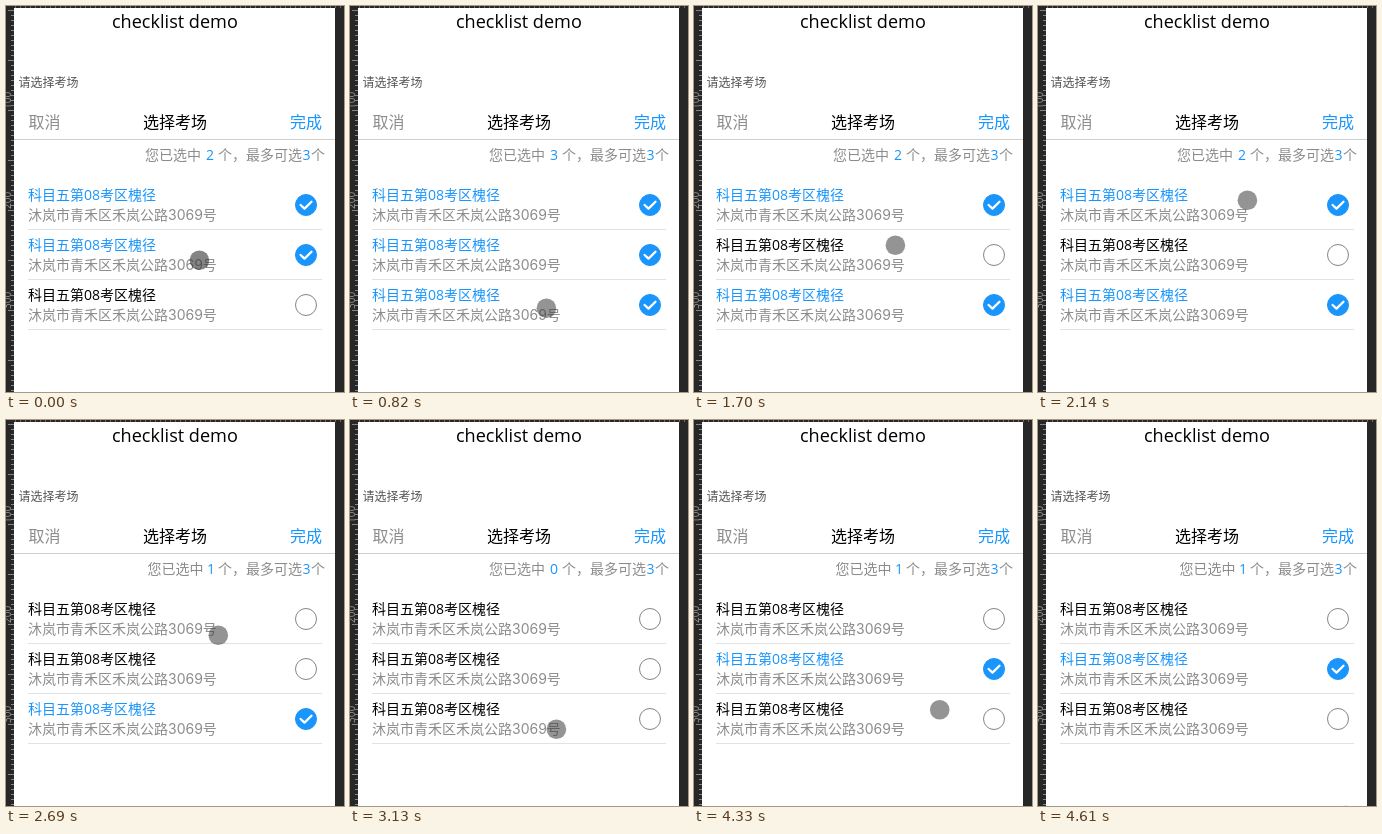
Animation, 338 px wide and 386 px high, one loop 5.04 s. Source, as an HTML page:

```html
<!DOCTYPE html>
<html lang="zh-CN">
<head>
<meta charset="utf-8">
<title>checklist demo</title>
<style>
  html, body { margin: 0; width: 100%; height: 100%; overflow: hidden; background: #272727; }
  svg { display: block; width: 338px; height: 386px; }
  text { font-family: "Open Sans", "Noto Sans CJK SC", "Noto Sans CJK", sans-serif; white-space: pre; }
  .address { font-family: Inter, "Noto Sans CJK SC", "Noto Sans CJK", sans-serif; }
</style>
</head>
<body>
<svg id="stage" viewBox="0 0 338 386"></svg>
<script>
const LOOP = 5040, TICK = 30, ROW = 50;
const BLUE = '#1a95fc', GREY = '#8c8c8c', BLACK = '#000';
const stage = document.getElementById('stage');

function add(tag, attrs, content) {
  const el = document.createElementNS('http://www.w3.org/2000/svg', tag);
  set(el, attrs);
  if (content !== undefined) el.textContent = content;
  return stage.appendChild(el);
}
function set(el, attrs) {
  for (const key in attrs) el.setAttribute(key, attrs[key]);
}
const label = (x, y, size, fill, content) =>
  add('text', { x, y, fill, 'font-size': size }, content);
const rect = (x, y, width, height, fill) =>
  add('rect', { x, y, width, height, fill });

function drawRulers() {
  rect(0, 0, 338, 386, '#272727');
  for (let y = 4; y < 386; y += 5) {
    const length = (y - 4) % 50 ? 3 : 6;
    rect(8 - length, y, length, 1, '#858585');
  }
  for (let x = 9; x < 338; x += 5) rect(x, 0, 1, 2, '#6a6a6a');
  for (let n = 100; n < 386; n += 100) {
    add('text', {
      transform: `translate(5 ${n + 3}) rotate(-90)`, fill: '#959595', 'font-size': 10
    }, n);
  }
}

function drawRow(i) {
  const y = 199 + i * ROW;
  const title = label(22, y - 4.7, 14, BLACK, '科目五第08考区槐径');
  set(label(22, y + 15.3, 14, GREY, '沐岚市青禾区禾岚公路3069号'), { class: 'address' });
  rect(22, y + 24, 294, 1, '#e2e2e2');
  const ring = add('circle', { cx: 300, cy: y, r: 10.5 });
  const check = add('path', {
    d: `M294.6 ${y}l3.9 3.6 7-6.8`, fill: 'none', stroke: '#fff',
    'stroke-width': 2.3, 'stroke-linecap': 'round', 'stroke-linejoin': 'round'
  });
  return on => {
    set(title, { fill: on ? BLUE : BLACK });
    set(ring, { fill: on ? BLUE : '#fff', stroke: on ? BLUE : '#858585' });
    set(check, { visibility: on ? 'visible' : 'hidden' });
  };
}

drawRulers();
rect(8, 2, 321, 384, '#fff');
label(106, 22, 18.1, BLACK, 'checklist demo');
label(12.5, 81, 12, '#555', '请选择考场');
label(22.4, 122.3, 16, GREY, '取消');
label(137, 122.3, 16, BLACK, '选择考场');
label(284, 122.3, 16, BLUE, '完成');
rect(8, 133, 321, 1, '#cfcfcf');

const lead = label(139, 154.3, 14, GREY, '您已选中');
const count = label(200, 154.3, 14, BLUE, '2');
label(212, 154.3, 14, GREY, '个，最多可选');
label(296.5, 154.3, 14, BLUE, '3');
label(305, 154.3, 14, GREY, '个');

const rows = [0, 1, 2].map(drawRow);
const dot = add('circle', { r: 9.8 });

// Each visit: the pointer travels to a spot, then a tap toggles the row there
const home = { x: 193.4, y: 254.3 };
const visits = [
  { start: 300, end: 470, x: 196.4, y: 302.3, tap: 820, row: 2 },
  { start: 1240, end: 1490, x: 201.4, y: 239.3, tap: 1700, row: 1 },
  { start: 2030, end: 2140, x: 209.4, y: 194.3, tap: 2350, row: 0 },
  { start: 2620, end: 2950, x: 206.4, y: 309.3, tap: 3130, row: 2 },
  { start: 3430, end: 3650, x: 211.4, y: 246.3, tap: 3800, row: 1 },
  { start: 4190, end: 4610, x: 308, y: 395.5 }
];

const smooth = p => p * p * (3 - 2 * p);

function pointerAt(t) {
  let from = home, pos = home;
  for (const to of visits) {
    if (t < to.start) break;
    const step = Math.floor((t - to.start) / TICK) + 1;
    const e = smooth(Math.min(1, step * TICK / (to.end - to.start)));
    const dx = to.x - from.x, dy = to.y - from.y;
    // Downward strokes swing out to the right
    const bow = Math.max(0, dy) * 0.2 * e * (1 - e);
    pos = { x: from.x + dx * e + bow, y: from.y + dy * e };
    from = to;
  }
  return pos;
}

function draw(t) {
  const on = [true, true, false];
  for (const { tap, row } of visits) if (t >= tap) on[row] = !on[row];
  rows.forEach((show, i) => show(on[i]));

  const total = on.filter(Boolean).length;
  const narrow = total === 1;
  count.textContent = total;
  set(count, { x: narrow ? 201 : 200 });
  set(lead, { x: narrow ? 141.5 : 139 });

  const { x, y } = pointerAt(t);
  const pressed = t < visits[0].start;
  set(dot, { cx: x, cy: y, fill: pressed ? 'rgba(50,50,50,.6)' : 'rgba(60,60,60,.55)' });
}

const began = performance.now();
function frame() {
  draw((performance.now() - began) % LOOP);
  requestAnimationFrame(frame);
}
frame();
</script>
</body>
</html>
```
